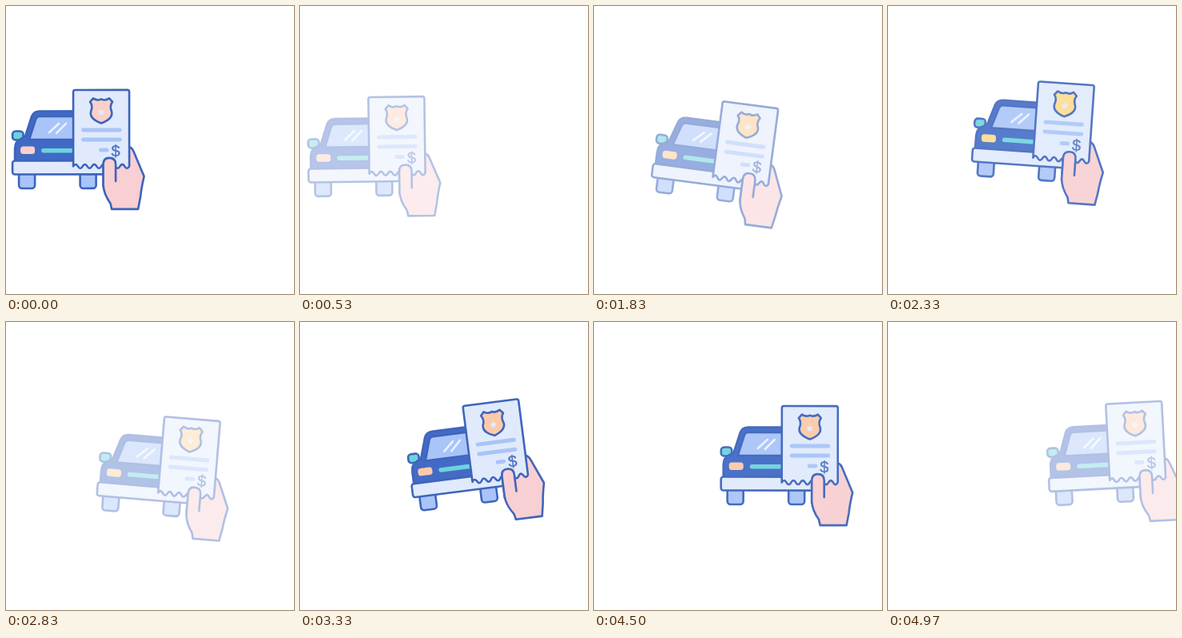
Write an HTML page that moves like this. It is 360x360 px and loops after 5010 ms.

```html
<!DOCTYPE html>
<html lang="en">
<head>
<meta charset="utf-8">
<title>Parking ticket</title>
<style>
  html, body { margin: 0; width: 100%; height: 100%; overflow: hidden; background: #fff; }
  svg { display: block; width: 100vw; height: 100vh; }
  .line { stroke: #3d64bb; stroke-width: 2.6; stroke-linecap: round; stroke-linejoin: round; }
  .pale { fill: #e0eafc; }
  .sky { fill: #a8c4f8; }
  .dark { fill: #416ac6; }
  .cyan { fill: #6cd3dc; }
  .skin { fill: #f8cfd2; }
  .print { stroke: #a8c4f8; stroke-width: 5; stroke-linecap: round; }
  .shine { stroke: #eaf2ff; stroke-width: 2.6; stroke-linecap: round; }
  .tint { fill: #fbd0c8; animation: tint 5010ms linear infinite; }
  .sum { font: 20px "Liberation Sans", Arial, sans-serif; fill: #4f73c2; stroke: #4f73c2; stroke-width: .4; }
  @keyframes tint {
    0% { fill: #fbd0c8; }
    21%, 30% { fill: #fcc79e; }
    46% { fill: #fedb8c; }
    66%, 100% { fill: #fccaaa; }
  }
</style>
</head>
<body>
<svg viewBox="0 0 360 360">
  <g id="art">
    <!-- car -->
    <g class="line">
      <rect class="sky" x="16" y="203" width="20" height="25" rx="4"/>
      <rect class="sky" x="92.5" y="203" width="20" height="25" rx="4"/>
      <rect class="cyan" x="8" y="156.5" width="13.5" height="11" rx="4"/>
      <path class="dark" d="M11 194V179Q11 170 17 167L24 163 32 138Q34.5 131.5 42 131.5H124V194Z"/>
      <path class="sky" d="M29 167L37 142Q38.5 138 42 138H124V167Z"/>
      <rect class="pale" x="8" y="193.5" width="120" height="17" rx="3"/>
    </g>
    <path class="shine" d="M54 158L66 147M63 159L75 147"/>
    <rect class="tint" x="18" y="175.5" width="18" height="9.5" rx="3.5"/>
    <rect class="cyan" x="44" y="178" width="50" height="5.5" rx="2.7"/>
    <!-- palm -->
    <path class="line skin" d="M152 176Q157 176 159.5 182L172.5 213Q169 228 168 238L165 254H132L130.5 247Q122 235 121.5 224V198H150Z"/>
    <!-- ticket -->
    <path id="ticket" class="line pale"/>
    <path class="line tint" d="M109 115.5Q114 119 119 116.5 124 119 129 115.5L133 120Q129 125 132 132 134 141 119 146.5 104 141 106 132 109 125 105 120Z"/>
    <path id="star" class="pale"/>
    <path class="print" d="M96.5 155H142M96.5 167H142M118.5 180H126"/>
    <text class="sum" x="131.5" y="188">$</text>
    <!-- thumb -->
    <path class="line skin" d="M121.5 226V198Q121.5 190 129 190 137 190 137 198V219"/>
  </g>
</svg>
<script>
const LOOP = 5010, SWAY = 1000, FADE = 0.65;
const PULSES = 4.5;
const TAU = Math.PI * 2;
const get = id => document.getElementById(id);
const art = get('art');

// A few key poses; the sway fills the time between them
const keys = [
  { t: 0, pose: [90, 180, 0] },
  { t: 1070, pose: [139.2, 182.5, -6.7] },
  { t: 1830, pose: [157, 194.3, 7.5] },
  { t: 2330, pose: [188.8, 169.5, 4] },
  { t: 3330, pose: [219, 178.7, -7.3] },
  { t: 4070, pose: [240.8, 173.8, 0] },
  { t: 4970, pose: [282, 177.3, -3] }
];

// Circling and tilting about the travelling centre: x, y, degrees
function sway(t) {
  const a = TAU * (t - 1730) / SWAY;
  return [-13 * Math.cos(a + 0.7), 12 * Math.cos(a), 4 * Math.cos(a)];
}

for (const key of keys) {
  const s = sway(key.t);
  key.rest = key.pose.map((v, i) => v - s[i]);
}

function pose(t) {
  const next = keys.findIndex(key => key.t > t);
  const n = next < 0 ? keys.length - 1 : next;
  const a = keys[n - 1], b = keys[n];
  const u = (t - a.t) / (b.t - a.t);
  return sway(t).map((s, i) => s + a.rest[i] + (b.rest[i] - a.rest[i]) * u);
}

// Triangle wave between full and faint
function pulse(t) {
  const p = t / LOOP * PULSES % 1;
  return 1 - FADE * (1 - Math.abs(1 - 2 * p));
}

function starPath(x, y, r) {
  const points = Array.from({ length: 10 }, (_, i) => {
    const a = TAU * (i / 10 - 0.25), q = i % 2 ? r * 0.55 : r;
    return [x + q * Math.cos(a), y + q * Math.sin(a)].join(' ');
  });
  return 'M' + points.join('L') + 'Z';
}

function ticketPath(waves) {
  const step = 70 / (waves * 2);
  return 'M86.5 105H151.5Q154 105 154 107.5V200.5'
    + `q${-step / 2} 5 ${-step} 0` + `t${-step} 0`.repeat(waves * 2 - 1)
    + 'V107.5Q84 105 86.5 105Z';
}

function draw(t) {
  const [x, y, tilt] = pose(t);
  art.setAttribute('transform', `translate(${x} ${y}) rotate(${tilt}) translate(-90 -180)`);
  art.setAttribute('opacity', pulse(t));
}

get('star').setAttribute('d', starPath(119, 133, 4.5));
get('ticket').setAttribute('d', ticketPath(6));

const start = performance.now();
function tick() {
  draw((performance.now() - start) % LOOP);
  requestAnimationFrame(tick);
}
tick();
</script>
</body>
</html>
```
